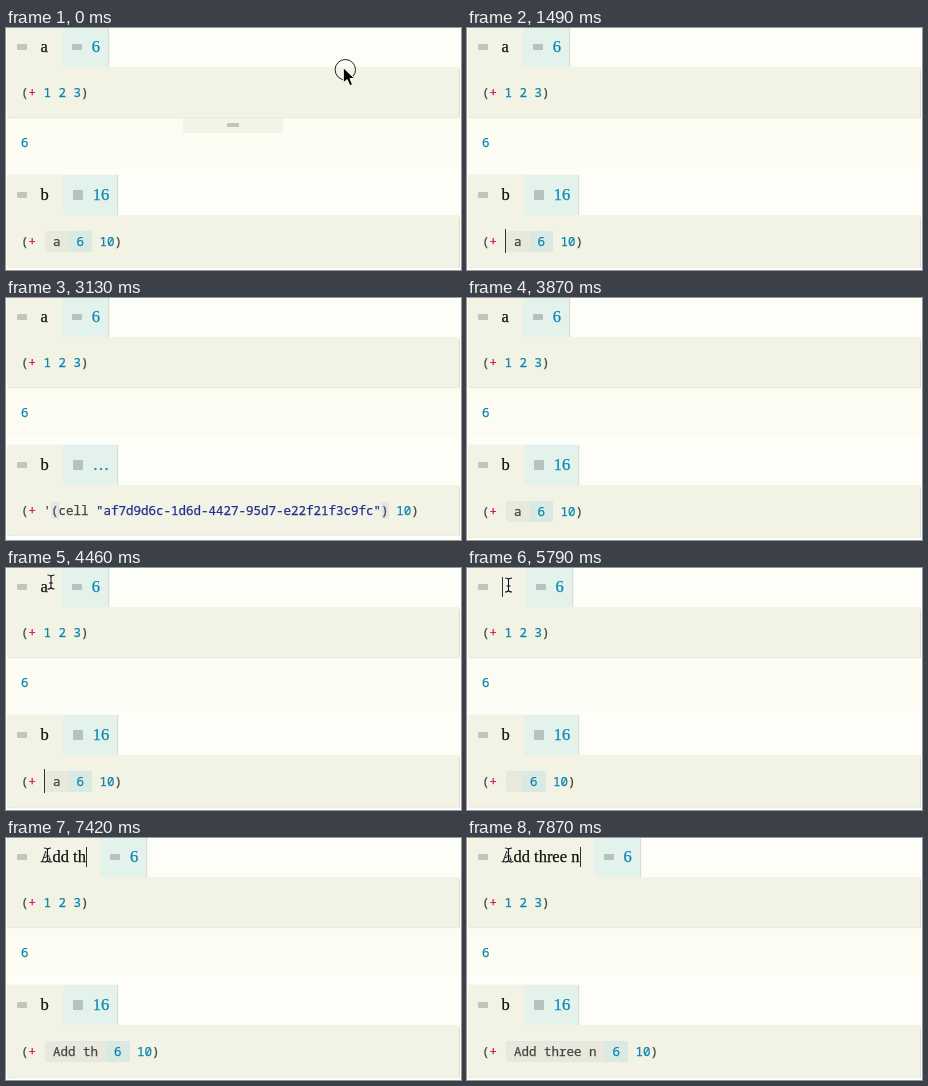
Animation, 455 px wide and 242 px high, one loop 8 s. Source, as an HTML page:

```html
<!DOCTYPE html>
<html lang="en">
<head>
<meta charset="utf-8">
<title>Notebook cells</title>
<style>
html, body { margin: 0; width: 100%; height: 100%; overflow: hidden; background: #fefef8; }
body { position: relative; font: 500 12.5px "Noto Sans Mono", monospace; color: #444; -webkit-text-stroke: .25px; }
body > * { position: absolute; }
.tabs { left: 1px; height: 40px; display: flex; font: 16.5px/20px "Liberation Serif", serif; color: #111; }
.tabs > div { position: relative; display: flex; align-items: center; box-shadow: 1px 0 1px #0002; }
.title { background: #f3f3e5; padding: 0 14.5px 0 33.5px; }
.value { background: #e3f2ea; color: #0a86b4; padding: 0 8.2px 0 29.5px; }
.tabs > div::before { content: ""; position: absolute; left: 10px; top: 17px; width: 10px; height: 6px; border-radius: 1px; background: #c4c5b9; }
.tabs > .value::before { background: #b2c4bb; }
#tabsB > .value::before { top: 15px; height: 10px; }
#name { position: relative; height: 20px; white-space: pre; }
#nameText:empty { padding-right: 10px; }
.caret { position: absolute; width: 1px; background: #333; }
#nameCaret { left: calc(100% + .5px); top: 0; height: 20px; }
#nameText:empty + #nameCaret { left: .5px; }
.code { left: 1px; width: 452px; height: 50px; box-sizing: border-box; padding-left: 14px; background: #f3f3e5;
  box-shadow: .5px 1px 1px #0002; display: flex; align-items: center; white-space: pre; }
.out { left: 1px; top: 89px; width: 452px; height: 49px; box-sizing: border-box; padding: 1px 0 0 14px; background: #fcfcf3; display: flex; align-items: center; }
b { font-weight: 500; color: #d6126f; }
.num { color: #0a84ad; }
.str { color: #1f2f8f; }
.match { background: #e5e5e5; }
.cell { display: inline-flex; height: 21px; line-height: 21px; margin-left: 1.5px; border-radius: 2px; background: #e8e8dc; }
.cell span { padding: 0 8px; }
.cell .num { background: #d9eae5; border-radius: 0 2px 2px 0; }
#handle { left: 177px; top: 90px; width: 100px; height: 15px; background: #f3f3e8; border-radius: 0 0 2px 2px; }
#handle::after { content: ""; position: absolute; left: 44px; top: 5px; width: 12px; height: 4px; border-radius: 1px; background: #c4c5b9; }
svg { left: 0; top: 0; overflow: visible; }
</style>
</head>
<body>
<div class="out num">6</div>
<div id="handle"></div>
<div class="tabs" style="top:-1px">
  <div class="title"><span id="name"><span id="nameText"></span><i id="nameCaret" class="caret"></i></span></div>
  <div class="value">6</div>
</div>
<div class="code" style="top:39px"><span>(<b>+</b> <span class="num">1 2 3</span>)</span></div>
<div class="tabs" id="tabsB" style="top:147px">
  <div class="title">b</div>
  <div class="value" id="sum"></div>
</div>
<div class="code" id="codeB" style="top:187px">
<span>(<b>+</b> </span><span class="cell" id="cell"><span id="ref"></span><span class="num">6</span></span><span id="raw">'<span class="match">(</span>cell <span class="str">"af7d9d6c-1d6d-4427-95d7-e22f21f3c9fc"</span><span class="match">)</span></span><span> <span class="num">10</span>)</span></div>
<i id="caretB" class="caret" style="top:201px"></i>
<svg width="455" height="242" fill="none">
  <defs><path id="beamPath" d="M-4-7Q-.5-7-.5-5V5Q-.5 7-4 7M3-7Q-.5-7-.5-5M-.5 5Q-.5 7 3 7M-2.5 1H1.5"/></defs>
  <g id="mouse">
    <circle id="ring" r="10.2" stroke="#222"/>
    <path id="arrow" d="M-2-2V13.2L1.8 9.8 4.5 16 7.2 14.8 4.7 8.8H9.2Z" fill="#000" stroke="#fff"/>
    <g id="beam">
      <use href="#beamPath" stroke="#fff" stroke-width="2.4"/>
      <use href="#beamPath" stroke="#111" stroke-width="1.1"/>
    </g>
  </g>
</svg>
<script>
const $ = id => document.getElementById(id);
const LOOP = 8000, FULL = "Add three n";
const show = (id, on) => $(id).style.display = on ? "" : "none";
const within = (t, ...spans) => spans.some(([a, b]) => t >= a && t < b);
// latest value of a list of [time, value] steps
const at = (t, steps) => steps.filter(s => s[0] <= t).pop()[1];

const typed = [[5790, 0], [6690, 1], [6840, 2], [6980, 3], [7130, 4], [7280, 6], [7430, 7], [7570, 9], [7720, 10], [7870, 11]];
const path = [[0, [339.3, 41.7]], [4170, [121, 3]], [4320, [72, 8]], [4460, [45.5, 14]], [4610, [43, 16]], [4760, [42, 17]]];

function draw(t) {
  const name = t < 5790 ? "a" : FULL.slice(0, at(t, typed));
  $("nameText").textContent = $("ref").textContent = name;
  show("nameCaret", within(t, [5050, 5650], [5790, 6390], [6690, LOOP]));

  const raw = within(t, [1640, 3430]);
  show("cell", !raw);
  show("raw", raw);
  $("sum").textContent = raw ? "…" : "16";
  $("codeB").style.height = raw ? "50px" : "52px";
  $("codeB").style.paddingTop = raw ? 0 : "1px";

  show("caretB", within(t, [450, 900], [1490, 2090], [2690, 3130], [3430, 3870], [4460, 5050]));
  $("caretB").style.left = raw ? "45px" : "38px";
  $("caretB").style.height = raw ? "22px" : "24px";

  $("handle").style.opacity = at(t, [[0, 1], [300, .5], [450, 0]]);
  show("mouse", t < 300 || t >= 4170);
  show("ring", within(t, [0, 150], [4900, 5200]));
  show("arrow", t < 4460);
  show("beam", t >= 4460);
  $("mouse").setAttribute("transform", `translate(${at(t, path)})`);
}

function tick() {
  draw(performance.now() % LOOP);
  requestAnimationFrame(tick);
}
tick();
</script>
</body>
</html>
```
